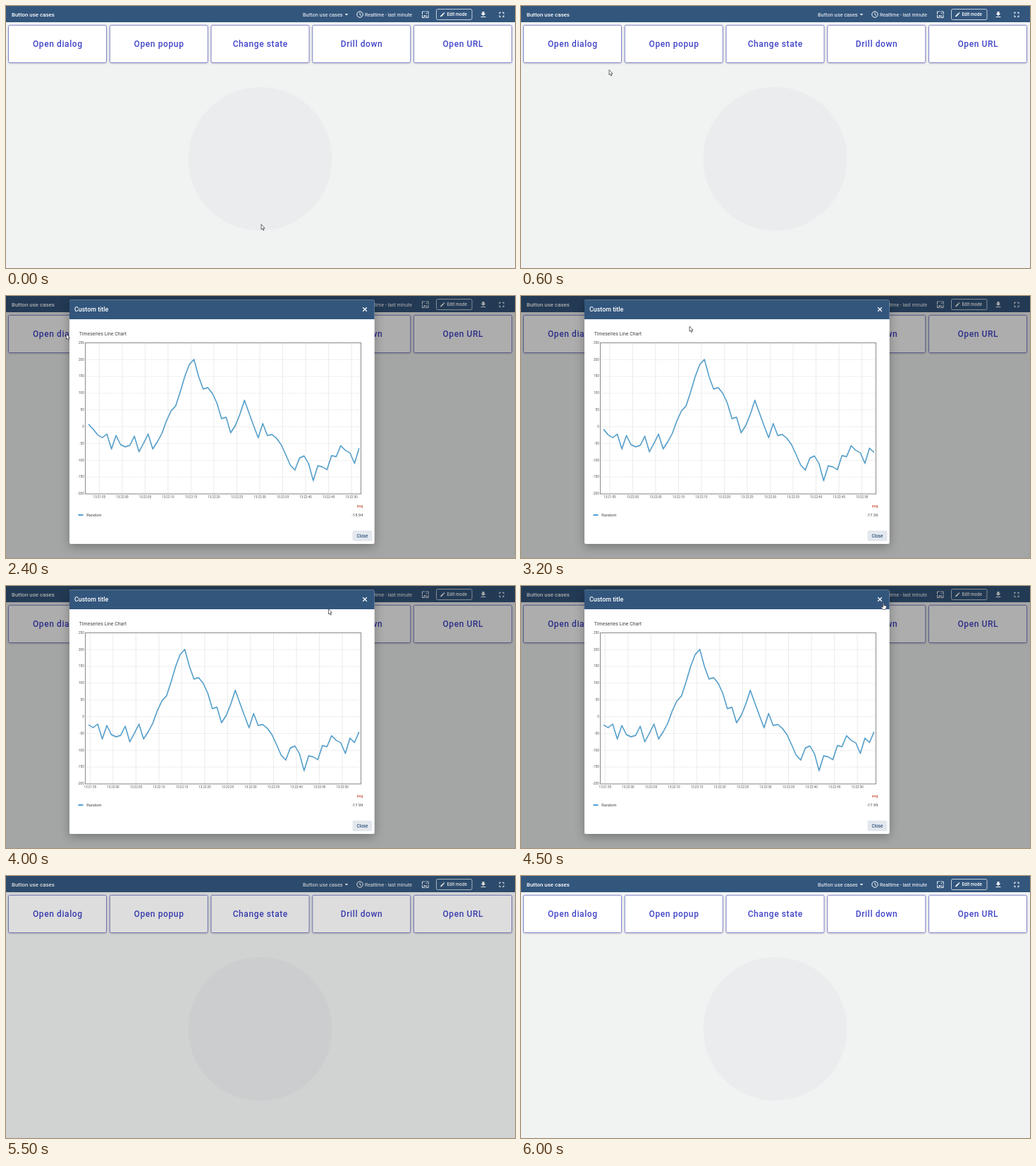
Animation, 722 px wide and 372 px high, one loop 6.5 s. Source, as an HTML page:

```html
<!DOCTYPE html>
<html lang="en">
<head>
<meta charset="utf-8">
<title>Button use cases</title>
<style>
html, body { margin: 0; width: 100%; height: 100%; overflow: hidden; background: #f1f3f3; }
svg { display: block; width: 100vw; height: 100vh; font-family: Roboto, Arial, sans-serif; }
.m { font-weight: 500; }
.w { fill: #fff; }
.mid { text-anchor: middle; }
.end { text-anchor: end; }
.tile { stroke: #8286cf; filter: drop-shadow(0 1px 1px rgba(0, 0, 0, .18)); }
#dialog { filter: drop-shadow(0 4px 7px rgba(0, 0, 0, .28)); }
</style>
</head>
<body>
<svg id="stage" viewBox="0 0 722 372" xmlns="http://www.w3.org/2000/svg"></svg>
<script>
const LOOP = 6500, STEP = 100;
const OPEN = 2400, CLOSE = 5400, FADE = 400;
const TICKS = [3000, 4000];
const AVERAGES = ['-15.94', '-17.36', '-17.99'];
const PLOT = { left: 112.5, right: 503.5, top: 66.5, bottom: 281 };
const DX = 6.505;

// Heights of the random series, one sample per second
const SERIES = [
  182, 189, 197, 201, 196, 217, 198, 211, 214, 212, 199, 221, 209, 196, 217, 207,
  195, 177, 163, 156, 136, 114, 97, 90, 114, 132, 130, 138, 152, 174, 172, 194,
  184, 168, 148, 166, 184, 201, 181, 198, 196.5, 202, 211, 225, 240, 247, 230, 227,
  238, 262, 241, 242.5, 246.5, 226.5, 228, 212.5, 219, 222.5, 237.5, 216, 222, 207
];
const SHOWN = 60;

// Cursor stops: time, x, y
const PATH = [
  [0, 362, 310], [700, 85.5, 54], [2800, 85.5, 54],
  [3200, 239, 43], [4200, 512, 30], [4500, 514, 23.5]
];

const ICONS = {
  edit: 'M3 17.25V21h3.75L17.81 9.94l-3.75-3.75zM20.71 7.04a1 1 0 0 0 0-1.41l-2.34-2.34a1 1 0 0 0-1.41 0l-1.83 1.83 3.75 3.75z',
  save: 'M19 9h-4V3H9v6H5l7 7zM5 18v2h14v-2z',
  full: 'M7 14H5v5h5v-2H7zM5 10h2V7h3V5H5zM17 17h-3v2h5v-5h-2zM14 5v2h3v3h2V5z',
  image: 'M4 4h7V2H4a2 2 0 0 0-2 2v7h2zM10 13l-4 5h12l-3-4-2 2.7zM17 8.5a1.5 1.5 0 1 0-3 0 1.5 1.5 0 0 0 3 0zM20 2h-7v2h7v7h2V4a2 2 0 0 0-2-2zM20 20h-7v2h7a2 2 0 0 0 2-2v-7h-2zM4 13H2v7a2 2 0 0 0 2 2h7v-2H4z'
};

const $ = id => document.getElementById(id);
const text = (x, y, size, str, cls = '', fill = '#fff', more = '') =>
  `<text x="${x}" y="${y}" font-size="${size}" class="${cls}" fill="${fill}" ${more}>${str}</text>`;
const rect = (x, y, w, h, fill, more = '') =>
  `<rect x="${x}" y="${y}" width="${w}" height="${h}" fill="${fill}" ${more}/>`;
const line = (x1, y1, x2, y2, stroke, width, more = '') =>
  `<path d="M${x1} ${y1}L${x2} ${y2}" stroke="${stroke}" stroke-width="${width}" ${more}/>`;
const icon = (name, x, y, scale) =>
  `<path class="w" d="${ICONS[name]}" transform="translate(${x} ${y}) scale(${scale}) translate(-12 -12)"/>`;

function tiles() {
  const labels = ['Open dialog', 'Open popup', 'Change state', 'Drill down', 'Open URL'];
  return labels.map((label, i) => {
    const x = 3.5 + i * 143.75;
    return rect(x, 27.3, 139, 53.2, '#fff', `rx="2" class="tile" id="tile${i}"`) +
      text(x + 69.8, 58.2, 12, label, 'm mid', '#4145c6', 'letter-spacing=".6"');
  }).join('');
}

function toolbar() {
  return rect(0, 0, 722, 23, '#33567d') +
    text(8, 14.8, 7.9, 'Button use cases', 'm') +
    text(421, 14.6, 7.4, 'Button use cases') +
    '<path class="w" d="M480.7 11h4.6l-2.3 2.5z"/>' +
    '<path d="M506.2 12a4.2 4.2 0 1 1-8.4 0 4.2 4.2 0 0 1 8.4 0zM502 9.5v2.8l1.9 1.2" fill="none" stroke="#fff"/>' +
    text(509, 14.6, 6.95, 'Realtime - last minute') +
    icon('image', 594.8, 12.2, .48) +
    rect(610.5, 4.5, 50.5, 15, 'none', 'rx="2" stroke="#d3dce5" stroke-width=".9"') +
    icon('edit', 619.3, 12.2, .34) +
    text(625.5, 14.3, 6.3, 'Edit mode', 'm') +
    icon('save', 677, 12.2, .48) + icon('full', 703, 12.2, .5);
}

function plotFrame() {
  const { left, right, top, bottom } = PLOT;
  let out = '';
  for (let i = 0; i < 10; i++) {
    const y = top + i * (bottom - top) / 9;
    out += line(left, y, right, y, '#d9d9d9', .6, 'stroke-dasharray="2 1"') +
      text(110.8, y + 1.3, 4.7, 250 - i * 50, 'end', '#545454');
  }
  return out + '<g id="axis"></g>' +
    rect(left, top, right - left, bottom - top, 'none', 'stroke="#8a8a8a"') +
    '<path id="shade" fill="none" stroke="#000" stroke-opacity=".12" stroke-width="1.6" transform="translate(.4 .8)"/>' +
    '<path id="curve" fill="none" stroke="#4b9dce" stroke-width="1.4" stroke-linejoin="round"/>';
}

function dialog() {
  return rect(90, 5.5, 432.7, 346.5, '#fff', 'rx="2"') +
    '<path d="M90 33V7.5a2 2 0 0 1 2-2h428.7a2 2 0 0 1 2 2V33z" fill="#33567d"/>' +
    text(97, 22.2, 8.9, 'Custom title', 'm') +
    '<path d="M506.2 16.2l5.6 5.6m0-5.6l-5.6 5.6" stroke="#fff" stroke-width="1.3"/>' +
    text(103.7, 55.6, 6.95, 'Timeseries Line Chart', '', '#444') +
    plotFrame() +
    text(506.5, 300, 5.7, 'avg', 'm end', '#c9583f') +
    line(102.5, 311, 109.5, 311, '#3a97cf', 1.8) +
    text(114.3, 312.8, 5.7, 'Random', '', '#444') +
    text(506.5, 312.8, 5.75, '', 'end', '#444', 'id="avg"') +
    rect(491.5, 333, 28, 15, '#e3e8ee', 'rx="2"') +
    text(505.5, 342.6, 6.3, 'Close', 'm mid', '#33567d');
}

$('stage').innerHTML =
  rect(0, 0, 722, 372, '#f1f3f3') +
  '<circle cx="360.5" cy="217" r="102" fill="#ebecee"/>' +
  tiles() + toolbar() +
  rect(0, 0, 722, 372, '#000', 'id="backdrop"') +
  `<g id="dialog">${dialog()}</g>` +
  '<g id="cursor" stroke="#2b2b35" stroke-width=".7" fill="#fff" stroke-linejoin="round">' +
  '<path id="arrow" d="M0 0v7.3l1.6-1.4 1.2 2.7 1.2-.5-1.1-2.7h2.2z"/>' +
  '<path id="hand" d="M-.7 1a.7.7 0 0 1 1.4 0v3l2.8.6q1 .3.9 1.3l-.5 2.2-.7 1.9h-3.6l-2.5-3q-.7-1 .2-1.2l2 .9z"/></g>';

function drawChart(shift) {
  const pts = SERIES.slice(shift, shift + SHOWN).map((y, i) => `${(117 + i * DX).toFixed(2)} ${y}`);
  for (const id of ['curve', 'shade']) $(id).setAttribute('d', 'M' + pts.join('L'));
  let axis = '';
  for (let i = 0; i < 12; i++) {
    const x = 132.3 + i * 5 * DX - shift * DX;
    const sec = (55 + i * 5) % 60;
    const label = `13:${i ? 22 : 21}:${String(sec).padStart(2, '0')}`;
    axis += line(x, PLOT.top, x, PLOT.bottom, '#dedede', .6) + text(x, 287, 4.5, label, 'mid', '#545454');
  }
  $('axis').innerHTML = axis;
  $('avg').textContent = AVERAGES[shift];
}

function cursorAt(t) {
  const i = PATH.findIndex(p => p[0] > t);
  if (i < 0) return PATH[PATH.length - 1].slice(1);
  const [a, b] = [PATH[i - 1], PATH[i]];
  const u = (t - a[0]) / (b[0] - a[0]);
  return [a[1] + (b[1] - a[1]) * u, a[2] + (b[2] - a[2]) * u];
}

const show = (id, on) => $(id).setAttribute('visibility', on ? 'visible' : 'hidden');
let lastShift = -1;

function render(ms) {
  const t = Math.floor((ms % LOOP) / STEP) * STEP;
  const open = t >= OPEN && t <= CLOSE;
  const fade = Math.min(1, Math.max(0, (t - CLOSE) / FADE));
  const shift = TICKS.filter(k => t >= k).length;
  if (shift !== lastShift) drawChart(lastShift = shift);

  $('backdrop').setAttribute('opacity', t < OPEN ? 0 : .32 * (1 - fade) ** 3);
  show('dialog', open);

  const [x, y] = cursorAt(t);
  const onTile = t < OPEN && x < 142 && y < 80;
  const hand = onTile || t >= 4200;
  $('cursor').setAttribute('transform', `translate(${x} ${y})`);
  show('arrow', t <= CLOSE && !hand);
  show('hand', t <= CLOSE && hand);
  $('tile0').setAttribute('fill', onTile ? '#f6f5fd' : '#fff');
}

const start = performance.now();
function tick() {
  render(performance.now() - start);
  requestAnimationFrame(tick);
}
tick();
</script>
</body>
</html>
```
